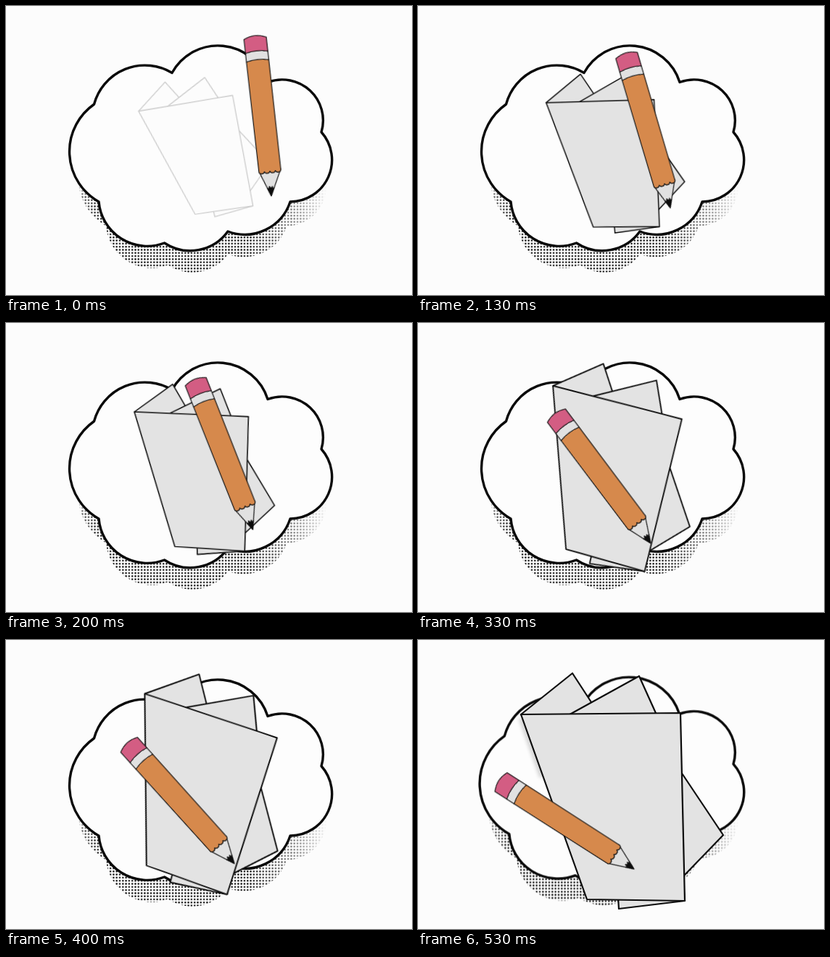
Recreate the animation shown at these times as an HTML page without scripts. Size 560 by 400 pixels, loop 0.6 s.

```html
<!DOCTYPE html>
<html lang="en">
<head>
<meta charset="utf-8">
<title>Papers and pencil</title>
<style>
  html, body { margin: 0; width: 100%; height: 100%; overflow: hidden; background: #fcfcfc; }
  svg { display: block; width: 100%; height: 100%; }

  .cloud, .papers, .sheet, .shade, .pencil { animation: 600ms step-end infinite; }
  .cloud { animation-name: cloud; }
  .papers { animation-name: papers; }
  .sheet { animation-name: ink; stroke-width: 2.2; stroke-linejoin: round; }
  .shade { animation-name: shade; }
  .pencil { animation-name: pencil; stroke: #151515; stroke-width: 1.2; stroke-linejoin: round; }

  @keyframes cloud {
    0% { transform: none; }
    88.333%, 100% { transform: translate(-3.1px, -3.7px) scale(1.007, 1.005); }
  }

  /* The sheets turn and grow evenly, then snap upright at full size. */
  @keyframes papers {
    0% { transform: translate(274.2px, 208.5px) rotate(-9.1deg) scale(.598); }
    10% { transform: translate(271.8px, 213.6px) rotate(-5.1deg) scale(.637); }
    21.667% { transform: translate(269.3px, 218.7px) rotate(-1.1deg) scale(.677); }
    33.333% { transform: translate(268.4px, 219.4px) rotate(2.9deg) scale(.716); }
    43.333% { transform: translate(267.5px, 220px) rotate(6.9deg) scale(.756); }
    55% { transform: translate(266.7px, 219.2px) rotate(15deg) scale(.835); }
    66.667% { transform: translate(266px, 218.5px) rotate(19deg) scale(.875); }
    76.667% { transform: translate(265.5px, 217.7px) rotate(23.1deg) scale(.914); }
    88.333%, 100% { transform: translate(276.2px, 231px); }
  }

  @keyframes ink {
    0% { fill: #fcfcfc; stroke: #cbcbcb; }
    10% { fill: #f0f0f0; stroke: #6c6c6c; }
    21.667%, 100% { fill: #e3e3e3; stroke: #0c0c0c; }
  }

  @keyframes shade {
    0% { opacity: 0; }
    88.333%, 100% { opacity: .16; }
  }

  /* Placed by the tip of the lead. */
  @keyframes pencil {
    0% { transform: translate(366px, 263px) rotate(-6.3deg); }
    10% { transform: translate(357px, 271px) rotate(-11.4deg); }
    21.667% { transform: translate(348px, 279.5px) rotate(-16.4deg); }
    33.333% { transform: translate(340.5px, 286px) rotate(-21.5deg); }
    43.333% { transform: translate(333px, 293px) rotate(-26.6deg); }
    55% { transform: translate(321px, 305px) rotate(-36.8deg); }
    66.667% { transform: translate(315px, 309.5px) rotate(-41.9deg); }
    76.667% { transform: translate(309px, 314px) rotate(-47deg); }
    88.333%, 100% { transform: translate(298px, 317px) rotate(-57.2deg); }
  }
</style>
</head>
<body>
<svg viewBox="0 0 560 400">
  <defs>
    <path id="puff" d="M128 271A80 80 0 0 1 121.5 136A72.5 72.5 0 0 1 229 92.5A72 72 0 0 1 361 105.5
      A56.5 56.5 0 0 1 435 174.5A58 58 0 0 1 392 271A66 66 0 0 1 306 312A64 64 0 0 1 218.5 328A67 67 0 0 1 128 271Z"/>
    <pattern id="dots" width="4.3" height="4.3" patternUnits="userSpaceOnUse">
      <circle cx="2.15" cy="2.15" r="1.25" fill="#0c0c0c"/>
    </pattern>
    <linearGradient id="across" gradientUnits="userSpaceOnUse" x1="95" y1="0" x2="448" y2="0">
      <stop offset="0" stop-color="#fff" stop-opacity=".7"/>
      <stop offset=".08" stop-color="#fff"/>
      <stop offset=".68" stop-color="#fff"/>
      <stop offset=".88" stop-color="#fff" stop-opacity=".5"/>
      <stop offset="1" stop-color="#fff" stop-opacity=".05"/>
    </linearGradient>
    <linearGradient id="down" gradientUnits="userSpaceOnUse" x1="0" y1="242" x2="0" y2="264">
      <stop offset="0" stop-color="#000"/>
      <stop offset="1" stop-color="#000" stop-opacity="0"/>
    </linearGradient>
    <mask id="fade" maskUnits="userSpaceOnUse" x="0" y="0" width="560" height="400">
      <use href="#puff" transform="translate(17 47) scale(.945 .95)" fill="url(#across)"/>
      <path d="M0 0H560V264H0Z" fill="url(#down)"/>
    </mask>
    <filter id="soft" x="-50%" y="-20%" width="200%" height="140%">
      <feGaussianBlur stdDeviation="2.5"/>
    </filter>
  </defs>

  <rect width="560" height="400" fill="#fcfcfc"/>

  <g class="cloud">
    <path d="M80 240H460V380H80Z" fill="url(#dots)" mask="url(#fade)"/>
    <use href="#puff" fill="#fdfdfd" stroke="#0a0a0a" stroke-width="3.4" stroke-linejoin="round"/>
  </g>

  <g class="papers">
    <g transform="translate(-276.25 -231)">
      <path class="shade" d="M142 108L171 190" stroke="#000" stroke-width="7" filter="url(#soft)"/>
      <path class="sheet" d="M142 103L213 46L300 180L200 200Z"/>
      <path class="sheet" d="M325 126L421 270L340 354L300 300Z"/>
      <path class="sheet" d="M202 107L305 50L350 150L368 361L277 372L275 340Z"/>
      <path class="sheet" d="M142 103L362 101L368 361L233 359Z"/>
    </g>
  </g>

  <g class="pencil">
    <path d="M-13.5 -36L0 0L17 -36Z" fill="#e1e1e1"/>
    <path d="M0 0L-4.6 -11.5L-2.6 -10.5L-1.2 -14L.8 -11L2.8 -13.5L3.6 -10.5L5.6 -11.5Z" fill="#0c0c0c" stroke-width=".8"/>
    <path d="M-13.8 -188Q1.7 -192 17.2 -188L17 -34.5a3.9 3.4 0 0 1 -7.6 0a3.9 3.4 0 0 1 -7.6 0a3.9 3.4 0 0 1 -7.6 0a3.9 3.4 0 0 1 -7.6 0Z" fill="#d6894c"/>
    <path d="M-13.8 -200Q1.7 -204 17.2 -200V-188Q1.7 -192 -13.8 -188Z" fill="#e1e1e1"/>
    <path d="M-13.8 -219.5Q1.7 -227 17.2 -219.5V-200Q1.7 -204 -13.8 -200Z" fill="#d35d83"/>
  </g>
</svg>
</body>
</html>
```
